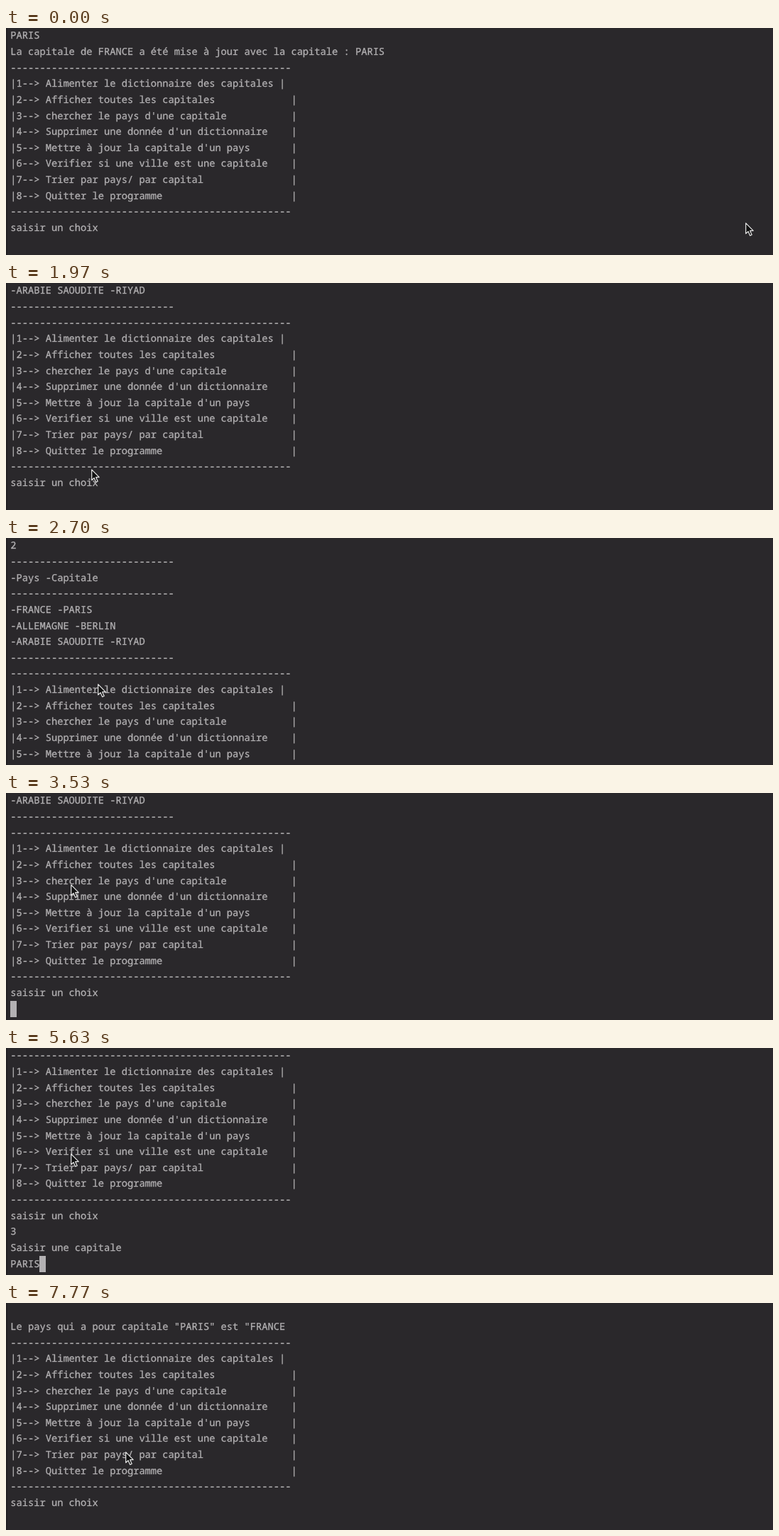
Animation of 1080 by 321 pixels, one loop 8 s. Source, as an HTML page:

```html
<!DOCTYPE html>
<html lang="fr">
<head>
<meta charset="utf-8">
<title>Console</title>
<style>
  html, body { margin: 0; width: 100%; height: 100%; overflow: hidden; background: #2a282b; }
  #stage { position: relative; width: 1080px; height: 321px; overflow: hidden; }
  #edge { position: absolute; left: 0; top: 0; width: 2px; height: 321px; background: #222023; }
  #text {
    position: absolute; left: 6.3px; top: 0.4px; margin: 0;
    font: 13.73px/22.62px "Noto Sans Mono", "DejaVu Sans Mono", monospace;
    font-variant-ligatures: none; text-rendering: geometricPrecision;
    color: #b3b1b3; -webkit-text-stroke: 0.3px #b3b1b3;
  }
  #caret { position: absolute; top: 294px; width: 8.5px; height: 23px; background: #b3b1b3; }
  #mouse { position: absolute; left: -2px; top: -2px; overflow: visible; }
</style>
</head>
<body>
<div id="stage">
  <div id="edge"></div>
  <pre id="text"></pre>
  <div id="caret"></div>
  <svg id="mouse" width="16" height="24" viewBox="-2 -2 16 24">
    <path d="M.7 .9V15.8L4.1 12.7L6.6 18.6L9.2 17.5L6.7 11.7H11.2Z"
      fill="#111" stroke="#e6e6e6" stroke-width="1.2" stroke-linejoin="round"/>
  </svg>
</div>
<script>
const LOOP = 8000, ROWS = 14, CELL = 8.238, BLINK = 505;
const $ = id => document.getElementById(id);
const text = $("text"), caret = $("caret"), mouse = $("mouse");

const dash = n => "-".repeat(n);
const items = [
  "Alimenter le dictionnaire des capitales", "Afficher toutes les capitales",
  "chercher le pays d'une capitale", "Supprimer une donnée d'un dictionnaire",
  "Mettre à jour la capitale d'un pays", "Verifier si une ville est une capitale",
  "Trier par pays/ par capital", "Quitter le programme"
];
const menu = [
  dash(48),
  ...items.map((s, i) => `|${i + 1}--> ${s}`.padEnd(i ? 48 : 46) + "|"),
  dash(48), "saisir un choix"
];

// Each prompt: start, first key, blink origin, output printed before it, typed answer
const prompts = [
  { at: 0, key: 1500, blink: 220, answer: "2", output: [
    "PARIS", "La capitale de FRANCE a été mise à jour avec la capitale : PARIS", ...menu] },
  { at: 1970, key: 4430, blink: 220, answer: "3", output: [
    dash(28), "-Pays -Capitale", dash(28), "-FRANCE -PARIS", "-ALLEMAGNE -BERLIN",
    "-ARABIE SAOUDITE -RIYAD", dash(28), ...menu] },
  { at: 4930, key: 5130, blink: 4930, answer: "PARIS", output: ["Saisir une capitale"] },
  { at: 5970, key: LOOP, blink: 5970, answer: "", output: [
    "", 'Le pays qui a pour capitale "PARIS" est "FRANCE', ...menu] }
];
const KEY_GAP = 125;

const log = [];
for (const p of prompts) {
  log.push(...p.output, p.answer);
  p.line = log.length - 1;
}

// Pointer moves: start, end, x, y, height of the arc
const home = [1041, 275];
const moves = [
  [170, 970, 120, 263, 86], [2000, 2330, 129, 215, 0], [2400, 2470, 129, 206, 0],
  [2730, 2930, 91, 129, 0], [3770, 4070, 91, 149, 0], [6100, 6500, 90, 40, 0],
  [6600, 7150, 376, 38, 0], [7250, 7770, 168, 210, 0]
];

const clamp = v => Math.min(1, Math.max(0, v));
const ease = p => p * p * (3 - 2 * p);

function pointer(t) {
  let [x, y] = home;
  for (const [start, end, toX, toY, arc] of moves) {
    const p = ease(clamp((t - start) / (end - start)));
    x += (toX - x) * p;
    y += (toY - y) * p - arc * Math.sin(Math.PI * p);
  }
  return [x, y];
}

// Lines scrolled back to look at the printed table
function lookBack(t) {
  const up = t < 2370 ? 0 : 1 + Math.floor(5 * clamp((t - 2370) / 330));
  const down = Math.floor(6 * clamp((t - 3030) / 470));
  return up - down;
}

let shown = "";
function draw(now) {
  const t = now % LOOP;
  const { line, answer, key, blink } = prompts.findLast(p => p.at <= t);
  const typed = t < key ? 0 : Math.min(answer.length, 1 + Math.floor((t - key) / KEY_GAP));
  const top = line - ROWS + 1 - lookBack(t);

  const page = [...log.slice(0, line), answer.slice(0, typed)].slice(top, top + ROWS).join("\n");
  if (page !== shown) text.textContent = shown = page;

  const origin = typed ? key + (typed - 1) * KEY_GAP : blink;
  const lit = Math.floor((t - origin) / BLINK) % 2 === 0;
  caret.style.display = lit && !lookBack(t) ? "block" : "none";
  caret.style.left = 6 + typed * CELL + "px";

  const [x, y] = pointer(t);
  mouse.style.transform = `translate(${x}px, ${y}px)`;
}

function tick() {
  draw(performance.now());
  requestAnimationFrame(tick);
}
tick();
</script>
</body>
</html>
```
